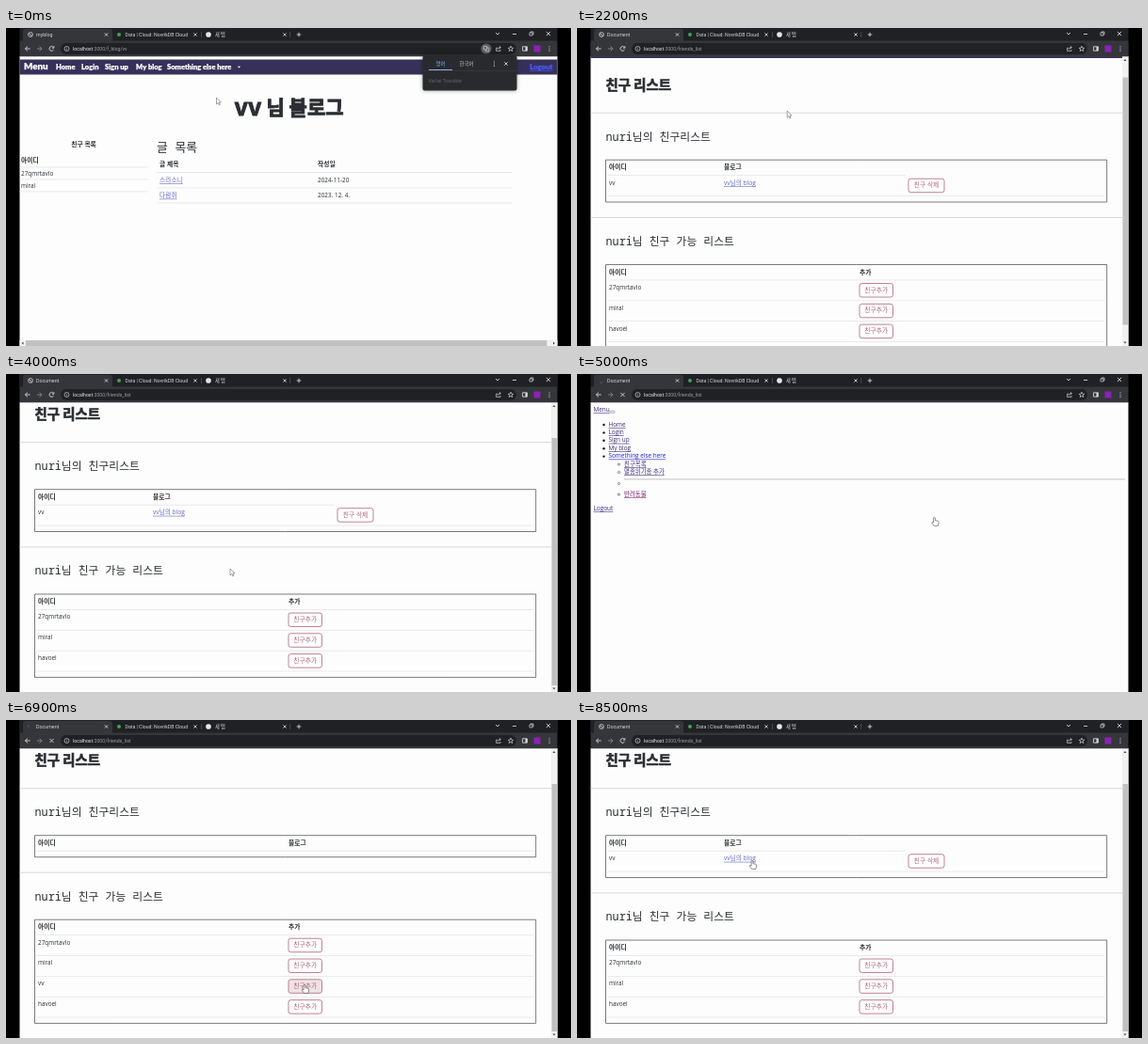
These frames come from a looping animation (600 px wide and 338 px high, 8600 ms). An HTML page with a canvas:

```html
<!DOCTYPE html>
<html lang="ko">
<head>
<meta charset="utf-8">
<style>
html, body { margin: 0; width: 100%; height: 100%; overflow: hidden; background: #000; }
canvas { display: block; width: 600px; height: 338px; }
</style>
</head>
<body>
<canvas id="stage"></canvas>
<script>
const LOOP = 8600, STEP = 100, MAX_SCROLL = 35;
const canvas = document.getElementById('stage');
const ctx = canvas.getContext('2d');
const ratio = window.devicePixelRatio || 1;
canvas.width = 600 * ratio;
canvas.height = 338 * ratio;

const CJK = '"Noto Sans CJK KR", "Noto Sans CJK", sans-serif';
const BODY = '"Open Sans", ' + CJK;
const UI = 'Roboto, ' + CJK;
const NAV = 'Lato, ' + CJK;
const MONO = '"Noto Sans Mono", "Noto Sans CJK KR", monospace';
const INK = '#2b2e33', LINE = '#e0e2e5', BAR = '#35363a', DARK = '#202124', LIGHT = '#d4d6da';
const LINK = '#6668c6', ROSE = '#ae6278', VISITED = '#3c2a78';

const friend = 'vv', me = 'nuri';
const others = ['27qmrtavlo', 'miral', 'havoel'];

// Pointer tip: time, x, y
const pointerKeys = [
  [0, 223.5, 74], [100, 223.5, 74], [400, 212, 42], [600, 213, 42], [900, 221, 57], [1400, 221.5, 56],
  [1900, 221.5, 56], [2300, 223.5, 94], [2700, 223.5, 94], [3400, 264, 241], [3700, 264, 241],
  [4000, 238, 207], [4500, 379.5, 152], [5500, 379.5, 152], [5800, 313, 240], [5900, 303.5, 258],
  [6100, 315, 279], [6400, 318, 282], [6500, 317, 281], [6900, 317, 281], [7200, 416.5, 272],
  [7700, 382, 201], [8400, 186, 149], [8600, 186, 149]
];
const during = (t, a, b) => t >= a && t < b;
const ease = p => p * p * (3 - 2 * p);

function pointerAt(t) {
  const i = Math.max(1, pointerKeys.findIndex(k => k[0] > t));
  const [t0, x0, y0] = pointerKeys[i - 1], [t1, x1, y1] = pointerKeys[i];
  const p = ease(Math.min(1, Math.max(0, (t - t0) / (t1 - t0))));
  return [x0 + (x1 - x0) * p, y0 + (y1 - y0) * p];
}

// "heavy" thickens the letters with an outline of that width
function text(str, x, y, size, color = INK, { font = BODY, weight = 400, align = 'left', underline, heavy } = {}) {
  ctx.font = `${weight} ${size}px ${font}`;
  ctx.textAlign = align;
  ctx.textBaseline = 'middle';
  ctx.fillStyle = color;
  ctx.fillText(str, x, y);
  if (heavy) {
    ctx.strokeStyle = color;
    ctx.lineWidth = heavy;
    ctx.strokeText(str, x, y);
  }
  if (underline) {
    const width = ctx.measureText(str).width;
    rect(align === 'right' ? x - width : x, y + size * .46, width, .6, color);
  }
}
function rect(x, y, w, h, color) {
  ctx.fillStyle = color;
  ctx.fillRect(x, y, w, h);
}
function pill(x, y, w, h, r, fill, stroke, width = .8) {
  ctx.beginPath();
  ctx.roundRect(x, y, w, h, r);
  if (fill) { ctx.fillStyle = fill; ctx.fill(); }
  if (stroke) { ctx.strokeStyle = stroke; ctx.lineWidth = width; ctx.stroke(); }
}
function disc(x, y, r, fill, stroke) {
  pill(x - r, y - r, 2 * r, 2 * r, r, fill, stroke);
}
function path(d, x, y, stroke, fill, width = .9) {
  const p = new Path2D(d);
  ctx.save();
  ctx.translate(x, y);
  if (fill) { ctx.fillStyle = fill; ctx.fill(p); }
  if (stroke) { ctx.strokeStyle = stroke; ctx.lineWidth = width; ctx.stroke(p); }
  ctx.restore();
}
const cross = (x, y, r, color = LIGHT) => path(`M${-r} ${-r}L${r} ${r}M${r} ${-r}L${-r} ${r}`, x, y, color);
const dots = (x, y, color = LIGHT) => [-2.2, 0, 2.2].forEach(d => disc(x, y + d, .6, color));

function browser(t, title, url, loading, onBlog) {
  rect(14, 0, 572, 14, DARK);
  pill(18, 1, 95, 16, 3, BAR);
  rect(14, 13.5, 572, 16.8, BAR);
  if (loading) {
    ctx.beginPath();
    ctx.arc(26, 7, 2.4, t / 130, t / 130 + 1.4);
    ctx.strokeStyle = '#5d6b80';
    ctx.lineWidth = .7;
    ctx.stroke();
  } else {
    disc(26, 7, 2.4, null, LIGHT);
    path('M-1.7-1Q0-1 .2 .4T1.6 1', 26, 7, LIGHT);
  }
  text(title, 32, 7, 5.3, LIGHT, { font: UI });
  disc(120, 7, 2, '#3fa15a');
  text('Data | Cloud: NovrikDB Cloud', 126.5, 7, 5.2, LIGHT, { font: UI });
  disc(215, 7, 2.8, '#e4e6e8');
  text('새 탭', 222, 7, 5.2, LIGHT, { font: UI });
  [106.5, 201, 296].forEach(x => cross(x, 7, 1.6));
  [207, 301.5].forEach(x => rect(x, 4, .6, 6, '#5f6368'));
  path('M-2.3 0H2.3M0-2.3V2.3', 311, 7, LIGHT);
  path('M-2-1L0 1L2-1', 522, 6, LIGHT);
  path('M-2 0H2', 540, 6.5, LIGHT);
  path('M-2-1H1V2H-2ZM-1-1V-2H2V1H1', 558, 6, LIGHT, null, .7);
  cross(576, 6, 2.1);

  path('M2.6 0H-2.6M0-2.4L-2.6 0L0 2.4', 23, 22, LIGHT);
  path('M-2.6 0H2.6M0-2.4L2.6 0L0 2.4', 35.5, 22, '#85878a');
  if (loading) cross(48.5, 22, 2.1);
  else path('M2 1.2A2.4 2.4 0 1 1 1.8-1.6M2.4-2.8V-.8H.4', 48.5, 22, LIGHT);
  pill(58, 16, 484, 12, 6, DARK);
  disc(64.5, 22, 2.5, null, '#b9bcc0');
  path('M0-.4V1.4M0-1.4V-.9', 64.5, 22, '#b9bcc0', null, .7);
  text('localhost', 71, 22, 5.2, '#e8eaed', { font: UI });
  const hostWidth = ctx.measureText('localhost').width;
  text(url, 71 + hostWidth, 22, 5.2, '#9aa0a6', { font: UI });
  if (onBlog) {
    if (t < 300) disc(510, 22, 5.6, '#5a5c60');
    path('M-2.6-2.6H.6V1H-2.6ZM0-1H2.8V2.8H-.4L-.8 1', 510, 22, LIGHT, null, .7);
  }
  path('M-1-.8H-2.4V2.4H2V1M-1 .8Q-.6-1.4 2.2-1.4M.8-2.8L2.4-1.4L.8 0', 523, 22, LIGHT, null, .7);
  path('M0-2.8L.8-.8L2.8-.7L1.2 .6L1.8 2.6L0 1.4L-1.8 2.6L-1.2 .6L-2.8-.7L-.8-.8Z', 536, 22, LIGHT, null, .7);
  path('M-2.4-2.2H2.4V2.2H-2.4Z', 551, 22, LIGHT);
  rect(551.5, 20, 2, 4, LIGHT);
  rect(560.5, 18.5, 7, 7, '#8a22b8');
  dots(577, 22);
}

function navbar() {
  const style = { font: NAV, weight: 900, heavy: .25 };
  const item = (s, x, size = 7.5) => text(s, x, 41.5, size, '#fff', style);
  rect(14, 33.5, 572, 16, '#37315a');
  item('Menu', 19, 9.8);
  item('Home', 53);
  item('Login', 80);
  item('Sign up', 105);
  item('My blog', 138);
  item('Something else here', 171);
  path('M-1.7-.8H1.7L0 1Z', 247.5, 41.5, null, '#fff');
  text('Logout', 580.5, 41.5, 7.7, '#4a59f5', { ...style, align: 'right', underline: true });
}

function arrows(points) {
  points.forEach(([d, x, y]) => path(d, x, y, null, '#505050'));
}

function blogPage(t) {
  const bold = { weight: 700 }, title = { font: CJK, weight: 900, heavy: .9 };
  navbar();
  text(friend, 242.5, 83.5, 25, INK, title);
  text('님 블로그', 276.5, 84, 21, INK, title);
  text('친구 목록', 82.5, 124, 6.76, INK, { weight: 700, align: 'center' });
  text('아이디', 16, 141, 6.76, INK, bold);
  others.slice(0, 2).forEach((name, i) => text(name, 16, 155 + i * 13, 6.4));
  [148, 161, 174].forEach(y => rect(14, y - .4, 136.5, .7, LINE));
  text('글 목록', 160, 127, 12.8, INK, { font: MONO, weight: 300 });
  text('글 제목', 163, 145.5, 6.76, INK, bold);
  text('작성일', 331, 145.5, 6.76, INK, bold);
  text('스라소니', 163, 162, 6.76, LINK, { underline: true });
  text('다람쥐', 163, 178.5, 6.76, LINK, { underline: true });
  text('2024-11-20', 331, 162, 6.4);
  text('2023. 12. 4.', 331, 178.5, 6.4);
  [153.5, 170, 186].forEach(y => rect(160, y - .4, 377, .7, LINE));
  rect(14, 331.5, 572, 6.5, '#f1f1f1');
  rect(21, 332, 553.5, 6, '#c1c1c1');
  arrows([['M1-1.6V1.6L-1 0Z', 17.5, 335], ['M-1-1.6V1.6L1 0Z', 582, 335]]);
  if (during(t, 600, 1200)) {
    pill(171, 50, 70, 57, 2.5, '#fff', '#c9c9cc', .6);
    if (t >= 800) rect(171.4, 53.5, 69.2, 13.8, '#e9ecef');
    text('친구목록', 178, 60.5, 6.76);
    text('멸종위기종 추가', 178, 74.3, 6.76);
    rect(171, 85, 70, .6, '#d0d0d3');
    text('반려동물', 178, 96.5, 6.76);
  }
}

function plainPage() {
  const link = (s, x, y, color = VISITED) => text(s, x, y, 6.4, color, { underline: true });
  link('Menu', 17.5, 38.5);
  pill(35, 39.3, 5, 2, .6, '#efefef', '#777', .5);
  ['Home', 'Login', 'Sign up', 'My blog', 'Something else here'].forEach((s, i) => {
    const y = 54 + i * 8.4;
    disc(28.5, y, 1.2, '#111');
    link(s, 33.5, y, i === 4 ? '#1a1ad8' : VISITED);
  });
  [96, 104.5, 116.5, 128].forEach(y => disc(44.5, y, 1.1, null, '#666'));
  link('친구목록', 50, 96);
  link('멸종위기종 추가', 50, 104.5);
  rect(50, 111.5, 532, .8, '#b0b0b0');
  link('반려동물', 50, 128, '#7a1a6b');
  link('Logout', 17.5, 143);
}

function button(label, x, y, w, [px, py]) {
  const hover = px > x && px < x + w && py > y && py < y + 14.5;
  pill(x, y, w, 14.5, 2.4, hover ? '#efe3e6' : '#fff', ROSE);
  text(label, x + w / 2, y + 7.4, 6.76, ROSE, { align: 'center' });
}

function table(top, rows, columns, drawRow, headRight = 560) {
  const pitch = 21.8, bottom = top + 23 + rows.length * pitch;
  columns.forEach(([label, x]) => text(label, x, top + 8.5, 6.76, INK, { weight: 700 }));
  rect(32, top + 16.1, headRight - 32, .7, LINE);
  rows.forEach((name, i) => {
    const y = top + i * pitch;
    text(name, 34, y + 24.8, 6.4);
    drawRow(y);
    rect(32, y + 38, 528, .7, LINE);
  });
  pill(30.5, top, 532.2, bottom - top, 0, null, '#5a5a5a');
  return bottom;
}

function friendsPage(t, scroll, linked) {
  const offset = MAX_SCROLL - scroll;
  const [px, py] = pointerAt(t - STEP);
  const probe = [px, py - offset];
  const h3 = (s, y) => text(s, 30.5, y, 11.8, INK, { font: MONO, weight: 300 });
  ctx.save();
  ctx.translate(0, -scroll);
  navbar();
  ctx.restore();
  ctx.save();
  ctx.translate(0, offset);
  text('친구 리스트', 30.5, 43, 14.4, INK, { font: CJK, weight: 900, heavy: .7 });
  rect(14, 72.3, 565, .8, '#cfcfcf');
  h3(me + '님의 친구리스트', 99);
  const bottom = table(122.7, linked ? [friend] : [], [['아이디', 34], ['블로그', linked ? 156 : 300]], y => {
    text(friend + '님의 blog', 156, y + 25, 6.6, LINK, { underline: true });
    button('친구 삭제', 352, y + 20, 38, probe);
  }, linked ? 349 : 560);
  rect(14, bottom + 16, 565, .8, '#cfcfcf');
  h3(me + '님 친구 가능 리스트', bottom + 42.5);
  const available = linked ? others : [others[0], others[1], friend, others[2]];
  table(bottom + 66.5, available, [['아이디', 34], ['추가', 300]],
    y => button('친구추가', 300, y + 20, 35.5, probe));
  ctx.restore();
  rect(579, 30, 7, 308, '#f1f1f1');
  rect(579.5, 37 + scroll * 31 / MAX_SCROLL, 5.5, 263, '#c1c1c1');
  arrows([['M-1.6 1H1.6L0-1Z', 582, 34], ['M-1.6-1H1.6L0 1Z', 582, 334.5]]);
}

function translatePopup() {
  ctx.save();
  ctx.shadowColor = 'rgba(0,0,0,.4)';
  ctx.shadowBlur = 4 * ratio;
  pill(442.5, 29.5, 100, 37, 2, '#292a2d');
  ctx.restore();
  text('영어', 461.5, 38, 5.4, '#8ab4f8', { font: UI, align: 'center' });
  text('한국어', 489, 38, 5.4, '#bdc1c6', { font: UI, align: 'center' });
  rect(449, 44, 25, 1, '#8ab4f8');
  rect(442.5, 45, 100, .5, '#3c4043');
  dots(518.5, 38);
  cross(531, 38, 1.7);
  text('Vorlan Translate', 448.5, 57, 4.9, '#64676b', { font: UI });
}

function status(label, width) {
  pill(14, 330, width, 9, [0, 2, 0, 0], DARK);
  text(label, 16, 334.3, 5, LIGHT, { font: UI });
}

function pointer(t) {
  const [x, y] = pointerAt(t);
  const hand = during(t, 500, 1200) || during(t, 4400, 5600) || during(t, 6000, 7000) || t >= 8300;
  if (hand) path('M-.9 5.2V.8Q0-.6 .9 .8V3.6L4 4.3Q4.8 4.6 4.7 5.5L4 9.3H-.5L-2.8 6.2Q-2.7 4.8-.9 6Z', x, y, '#444', '#fff', .6);
  else path('M0 0V7L1.7 5.5L2.7 7.9L3.8 7.4L2.8 5H5Z', x, y, '#666', '#fff', .6);
}

function draw(t) {
  const onBlog = t < 1500;
  const plain = during(t, 1500, 1700) || during(t, 4900, 5200) || during(t, 7000, 7100);
  const loading = during(t, 1200, 1700) || during(t, 4700, 5200) || during(t, 6900, 7100);
  const scroll = t < 2000 ? 0 : MAX_SCROLL * ease(Math.min(1, (t - 2000) / 400));
  const linked = t < 4900 || t >= 7000;

  ctx.setTransform(ratio, 0, 0, ratio, 0, 0);
  rect(0, 0, 600, 338, '#000');
  ctx.save();
  ctx.beginPath();
  ctx.rect(14.5, 0, 571, 338);
  ctx.clip();
  rect(14, 30, 572, 308, '#fdfdfd');
  if (plain) plainPage();
  else if (onBlog) blogPage(t);
  else friendsPage(t, scroll, linked);
  browser(t, onBlog ? 'myblog' : 'Document', onBlog ? ':3000/f_blog/' + friend : ':3000/friends_list', loading, onBlog);
  if (t < 300) translatePopup();
  if (during(t, 800, 1500)) status('localhost:3000/friends_list', 60.5);
  if (during(t, 7100, 7600)) status('localhost의 응답을 기다리는 중...', 190);
  pointer(t);
  ctx.restore();
}

function tick() {
  draw(Math.floor(performance.now() % LOOP / STEP) * STEP);
  requestAnimationFrame(tick);
}
tick();
</script>
</body>
</html>
```
